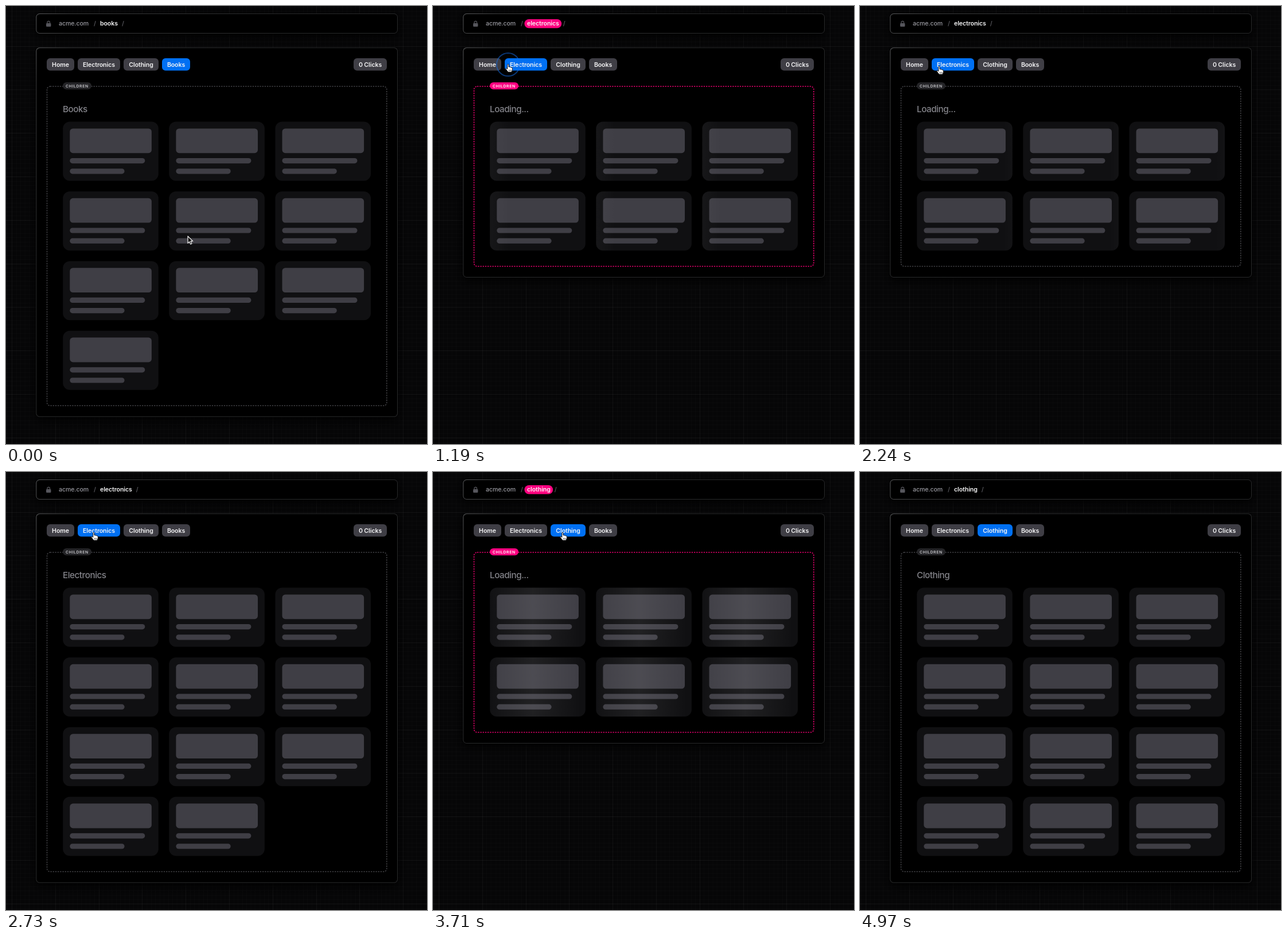
An HTML page with a canvas that plays this animation: 734 by 763 pixels, repeating every 5040 ms.

```html
<!DOCTYPE html>
<html lang="en">
<head>
<meta charset="utf-8">
<title>Nested layout navigation</title>
<style>
  html, body { margin: 0; width: 100%; height: 100%; overflow: hidden; background: #060607; }
  canvas { display: block; }
</style>
</head>
<body>
<canvas id="stage" width="734" height="763"></canvas>
<script>
const ctx = document.getElementById('stage').getContext('2d');
const LOOP = 5040, LOAD_TIME = 1200, GRID = 75.8;
const PINK = [255, 0, 128];

const buttons = [
  { label: 'Home', x: 71, w: 48 },
  { label: 'Electronics', x: 125, w: 74 },
  { label: 'Clothing', x: 205, w: 61 },
  { label: 'Books', x: 272, w: 49 },
];
const visits = [
  { at: -9999, page: 'Books', cards: 10 },
  { at: 1120, page: 'Electronics', cards: 11 },
  { at: 3330, page: 'Clothing', cards: 12 },
];
const clicks = [{ at: 1080, x: 131, y: 102 }, { at: 3230, x: 227, y: 107 }];
// time, x, y of the pointer tip
const path = [
  [60, 317, 401], [610, 148, 104], [720, 148, 104], [980, 131, 101.5],
  [1500, 131, 101.5], [2000, 138, 105.5], [2600, 138, 105.5], [3100, 226, 105.5],
];

const clamp = v => Math.min(1, Math.max(0, v));
const ease = u => u * u * (3 - 2 * u);
const mix = (a, b, u) => `rgb(${a.map((v, i) => Math.round(v + (b[i] - v) * u))})`;

function box(x, y, w, h, r, fill) {
  ctx.beginPath();
  ctx.roundRect(x, y, w, h, r);
  ctx.fillStyle = fill;
  ctx.fill();
}

function text(str, x, y, size, weight, color, spacing = -0.1, align = 'left') {
  ctx.font = `${weight} ${size}px Inter, sans-serif`;
  ctx.letterSpacing = spacing + 'px';
  ctx.textAlign = align;
  ctx.fillStyle = color;
  ctx.fillText(str, x, y);
  return ctx.measureText(str).width;
}

function gridLines(step, offsetX, offsetY, color) {
  ctx.fillStyle = color;
  for (let x = offsetX; x < 734; x += step) ctx.fillRect(Math.round(x), 0, 1, 763);
  for (let y = offsetY; y < 763; y += step) ctx.fillRect(0, Math.round(y), 734, 1);
}

function panel(y, h) {
  const glow = ctx.createRadialGradient(52, y, 0, 52, y, 420);
  glow.addColorStop(0, '#5a5b5d');
  glow.addColorStop(0.15, '#3a3b3c');
  glow.addColorStop(1, '#272829');
  ctx.shadowColor = '#000';
  ctx.shadowBlur = 18;
  ctx.shadowOffsetY = 5;
  box(52.3, y, 630.7, h, 6.5, glow);
  ctx.shadowColor = 'transparent';
  box(53.3, y + 1, 628.7, h - 2, 5.5, '#000');
}

function lock() {
  box(70, 30, 8.4, 6, 1.3, '#56565c');
  ctx.beginPath();
  ctx.moveTo(71.9, 31);
  ctx.lineTo(71.9, 28.6);
  ctx.arc(74.2, 28.6, 2.3, Math.PI, 0);
  ctx.lineTo(76.5, 31);
  ctx.strokeStyle = '#56565c';
  ctx.lineWidth = 1.2;
  ctx.stroke();
}

function addressBar(page, flash) {
  panel(13, 35);
  lock();
  text('acme.com', 92, 34.4, 10.6, 500, '#98989f');
  text('/', 155, 34.4, 10.6, 500, '#606066', 0, 'center');
  const slug = page.toLowerCase();
  ctx.font = '600 10.6px Inter, sans-serif';
  ctx.letterSpacing = '-0.1px';
  const w = ctx.measureText(slug).width;
  ctx.globalAlpha = flash;
  box(159.4, 23, w + 9, 15.6, 7.8, mix(PINK, PINK, 0));
  ctx.globalAlpha = 1;
  text(slug, 164, 34.4, 10.6, 600, '#f6f6f7');
  text('/', 164 + w + 9, 34.4, 10.6, 500, '#606066', 0, 'center');
}

function card(x, y, shimmer) {
  box(x, y, 166.6, 102.9, 12, '#101012');
  box(x + 12.1, y + 11.8, 142.6, 42.8, 5.5, '#3f3e45');
  box(x + 12.1, y + 63.4, 131, 9.2, 4.6, '#3f3e45');
  box(x + 12.1, y + 81.6, 95.3, 9.2, 4.6, '#3f3e45');
  if (shimmer === null) return;
  const left = x + 166.6 * shimmer;
  const band = ctx.createLinearGradient(left, 0, left + 166.6, 0);
  band.addColorStop(0, 'rgba(255,255,255,0)');
  band.addColorStop(0.5, 'rgba(255,255,255,.07)');
  band.addColorStop(1, 'rgba(255,255,255,0)');
  box(x, y, 166.6, 102.9, 12, band);
}

function pointerAt(t) {
  let i = 0;
  while (i < path.length - 2 && t > path[i + 1][0]) i++;
  const [t0, x0, y0] = path[i], [t1, x1, y1] = path[i + 1];
  const u = ease(clamp((t - t0) / (t1 - t0)));
  return { x: x0 + (x1 - x0) * u, y: y0 + (y1 - y0) * u };
}

const arrowShape = new Path2D('M0 0V12.2L2.8 9.6L4.7 14L6.9 13L5 8.7H8.8Z');
const handShape = new Path2D('M-1.2 .8C-1.2-.6 1-.6 1 .8V4.6L2.2 4.4Q3.2 4.4 3.4 5.2Q5 4.6 5.5 5.8' +
  'Q7.4 5.4 7.4 7.2V9.6Q7.2 11.2 6.2 12.4V13.6H-.2Q-1.2 11.8-3.2 9.4Q-4.8 7.6-3.6 7Q-2.6 6.8-1.2 8.4Z');

function pointer(p, hand, alpha) {
  ctx.save();
  ctx.globalAlpha = alpha;
  ctx.translate(p.x, p.y);
  const shape = hand ? handShape : arrowShape;
  ctx.lineJoin = 'round';
  ctx.lineWidth = hand ? 1 : 1.2;
  ctx.fillStyle = hand ? '#fff' : '#111';
  ctx.strokeStyle = hand ? '#111' : '#eee';
  ctx.fill(shape);
  ctx.stroke(shape);
  if (hand) {
    ctx.lineWidth = 0.7;
    ctx.stroke(new Path2D('M1.2 9.4V12M3.1 9.4V12M5 9.4V12'));
  }
  ctx.restore();
}

function ring(t, { at, x, y }) {
  const u = (t - at) / 300;
  if (u < 0 || u > 1) return;
  ctx.beginPath();
  ctx.arc(x, y, 8 + 20 * u * (2 - u), 0, 7);
  ctx.strokeStyle = `rgba(20,110,230,${0.8 * (1 - u)})`;
  ctx.lineWidth = 2;
  ctx.stroke();
}

function draw(t) {
  const { at, page, cards } = visits.findLast(v => t >= v.at);
  const age = t - at;
  const loading = age < LOAD_TIME;
  const flash = 1 - ease(clamp((age - 400) / 600));
  const height = loading ? 400.7 : 643.5;
  const p = pointerAt(t);
  const over = b => p.y > 91 && p.y < 113 && p.x > b.x && p.x < b.x + b.w;

  ctx.fillStyle = '#060607';
  ctx.fillRect(0, 0, 734, 763);
  gridLines(GRID / 10, 2.4, 1.5, 'rgba(255,255,255,.016)');
  gridLines(GRID, 10, 69.5, 'rgba(255,255,255,.035)');

  addressBar(page, flash);
  panel(72.3, height);

  for (const b of buttons) {
    const fill = b.label === page ? '#0070f3' : over(b) ? '#6d6d76' : '#3f3e45';
    box(b.x, 91, b.w, 21.6, 6, fill);
    text(b.label, b.x + b.w / 2, 105.6, 10.6, 600, '#f4f4f5', -0.1, 'center');
  }
  box(606, 91, 58, 21.6, 6, '#3f3e45');
  text('0 Clicks', 635, 105.6, 10.6, 600, '#f4f4f5', -0.1, 'center');

  ctx.beginPath();
  ctx.roundRect(71.5, 140, 592.3, height - 87.2, 5.5);
  ctx.setLineDash([2.3, 1.9]);
  ctx.strokeStyle = mix([66, 66, 70], [235, 0, 112], flash);
  ctx.lineWidth = 1.5;
  ctx.stroke();
  ctx.setLineDash([]);
  box(99, 133, 50, 12.2, 6.1, mix([36, 36, 39], PINK, flash));
  text('CHILDREN', 104, 141.5, 6.82, 600, mix([200, 200, 204], [255, 255, 255], flash), 0.66);

  text(loading ? 'Loading...' : page, 99, 184.6, 15.2, 500, '#84848a', -0.45);
  const shimmer = loading ? 1 - 2 * (1 - clamp(age / 1500)) ** 2.2 : null;
  for (let i = 0; i < (loading ? 6 : cards); i++) {
    card(99.2 + i % 3 * 185.1, 201.6 + Math.floor(i / 3) * 121.4, shimmer);
  }

  clicks.forEach(c => ring(t, c));
  pointer(p, buttons.some(over), 1 - clamp((t - 4600) / 200));
}

function frame(now) {
  draw(now % LOOP);
  requestAnimationFrame(frame);
}
draw(0);
requestAnimationFrame(frame);
</script>
</body>
</html>
```
